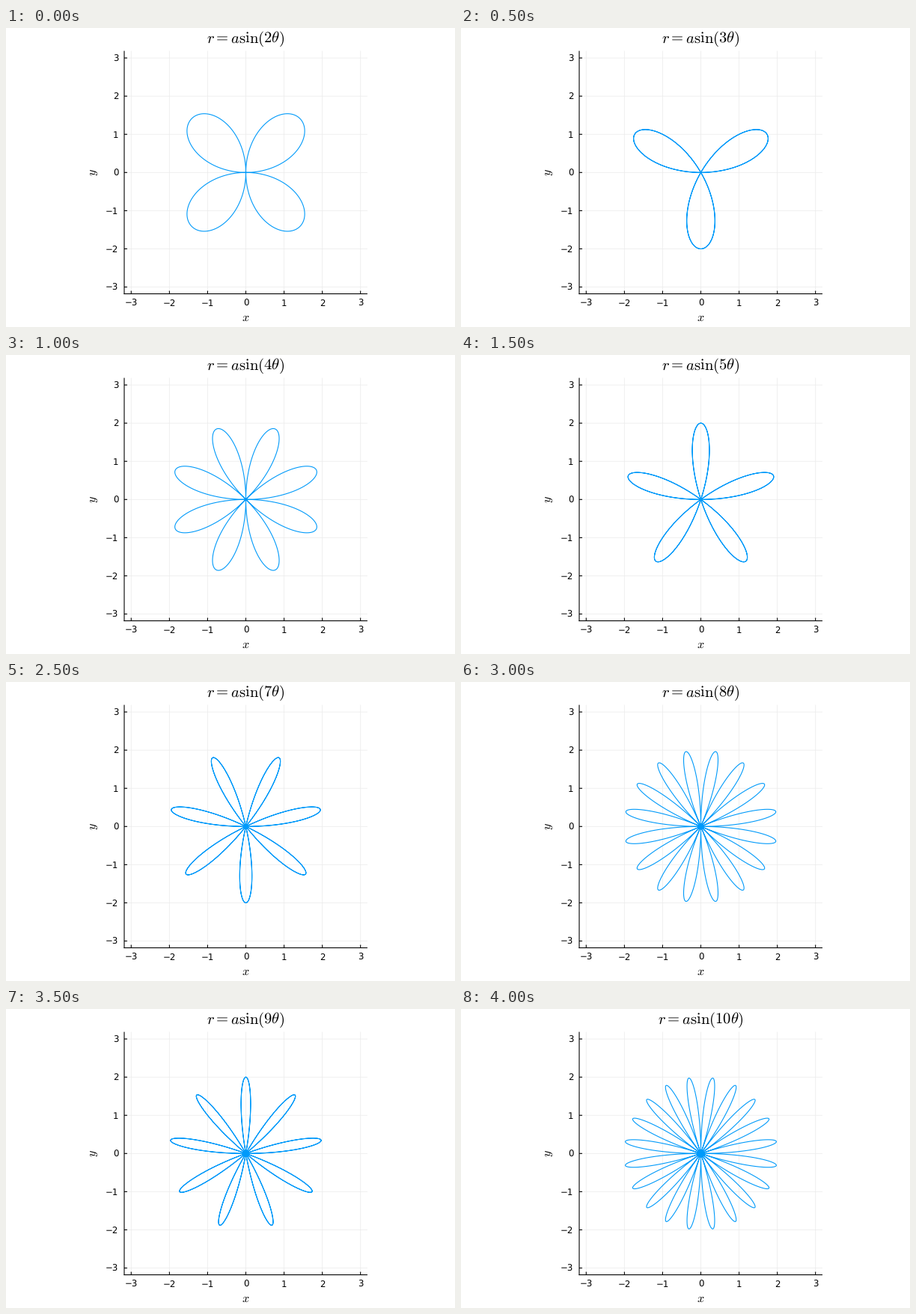
Animation, 600 px wide and 400 px high, one loop 4.5 s. Source, as a matplotlib script:

```python
import numpy as np
import matplotlib.pyplot as plt
from matplotlib.animation import FuncAnimation

W, H, DPI = 600, 400, 100
CX, CY, UNIT = 320.5, 193.3, 51.07      # pixel position of the origin, pixels per unit
LEFT, RIGHT, TOP, BOTTOM = 158.0, 483.0, 30.6, 355.6
AMP = 2
PETALS = range(2, 11)
STEP_MS = 500

plt.rcParams.update({
    "font.family": "DejaVu Sans",
    "mathtext.fontset": "cm",
    "text.hinting": "none",
    "path.simplify": False,
})


def pt(px):
    return px * 72 / DPI


fig = plt.figure(figsize=(W / DPI, H / DPI), dpi=DPI, facecolor="white")
ax = fig.add_axes([0, 0, 1, 1])
ax.set_xlim(0, W)
ax.set_ylim(H, 0)
ax.axis("off")


def segment(x0, y0, x1, y1, color="black", width=1.1):
    ax.plot([x0, x1], [y0, y1], color=color, lw=pt(width),
            solid_capstyle="butt", snap=False)


def label(x, y, text, size, **kw):
    return ax.text(x, y, text, fontsize=pt(size), color="black", **kw)


def formula(n):
    return rf"$r = a\mathrm{{sin}}({n}\theta)$"


for v in range(-3, 4):
    x, y = CX + v * UNIT, CY - v * UNIT
    segment(x, TOP, x, BOTTOM, "#ececec", 0.8)
    segment(LEFT, y, RIGHT, y, "#ececec", 0.8)

for v in range(-3, 4):
    x, y = CX + v * UNIT, CY - v * UNIT
    segment(x, BOTTOM, x, BOTTOM - 4)
    segment(LEFT, y, LEFT + 4, y)
    text = str(v).replace("-", "\u2212")
    label(x, 371.7, text, 11.8, ha="center", va="baseline")
    label(150.5, y + 4.3, text, 11.8, ha="right", va="baseline")

segment(LEFT - 0.5, BOTTOM, RIGHT, BOTTOM)
segment(LEFT, TOP, LEFT, BOTTOM + 0.5)

label(CX, 392, "$x$", 16.2, ha="center", va="baseline")
label(117.5, CY, "$y$", 16.2, ha="center", va="center", rotation=90)
title = label(CX - 0.5, 20, formula(2), 20.6, ha="center", va="baseline")

theta = np.linspace(0, 2 * np.pi, 2001)
rose, = ax.plot([], [], color="#009afa", lw=pt(1.1), snap=False)


def draw(i):
    n = PETALS[i]
    r = AMP * np.sin(n * theta)
    rose.set_data(CX + UNIT * r * np.cos(theta), CY - UNIT * r * np.sin(theta))
    title.set_text(formula(n))
    return rose, title


anim = FuncAnimation(fig, draw, frames=len(PETALS), interval=STEP_MS,
                     repeat=True, repeat_delay=0)
plt.show()
```
